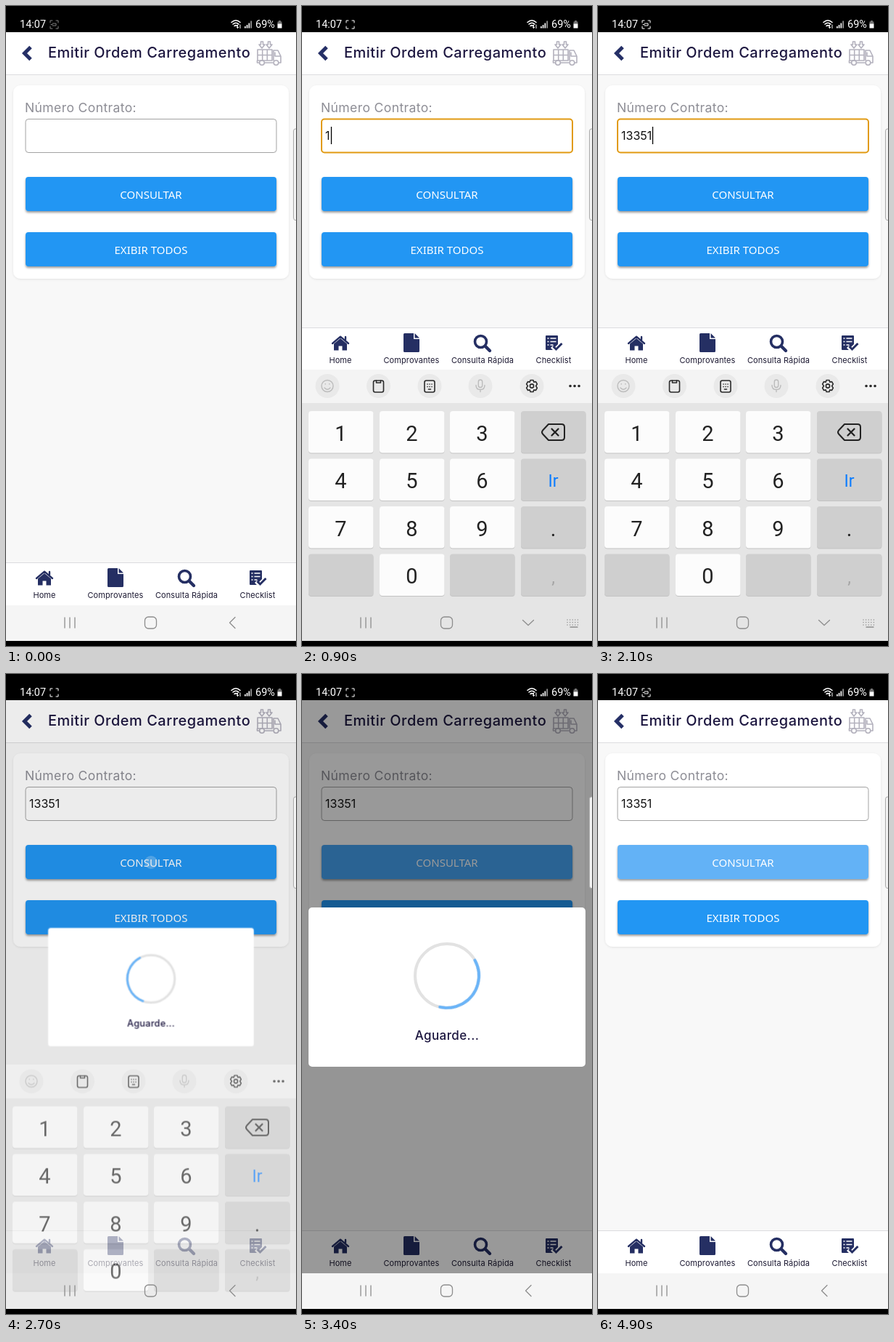
Animation, 400 px wide and 880 px high, one loop 5000 ms. Source, as an HTML page:

```html
<!DOCTYPE html>
<html lang="pt-BR">
<head>
<meta charset="utf-8">
<title>Emitir Ordem Carregamento</title>
<style>
html, body { margin: 0; width: 100%; height: 100%; overflow: hidden; background: #000; }
svg { display: block; width: 100%; height: 100%; }
text { font-family: Inter, sans-serif; }
.roboto { font-family: Roboto, sans-serif; }
.mid { text-anchor: middle; }
.line { fill: none; stroke-linecap: round; stroke-linejoin: round; }
.title { font-size: 20px; font-weight: 500; letter-spacing: .5px; fill: #1d1740; }
.label { font-size: 17.6px; letter-spacing: .35px; fill: #8d8d95; }
.value { font-size: 16px; fill: #111; }
.button { font: 15px "Noto Sans", sans-serif; fill: #fff; text-anchor: middle; }
.tab { font-size: 11px; letter-spacing: .1px; fill: #1d1a33; text-anchor: middle; }
.wait { font-size: 17px; font-weight: 500; letter-spacing: .4px; fill: #1d1740; text-anchor: middle; }
.key { font: 29px Roboto, sans-serif; fill: #222; text-anchor: middle; }

/* One loop is 50 ticks of 100 ms: 2% each */
.anim { animation: 5s step-end infinite; }
#frame { animation-name: focus; }
#caret { animation-name: caret; }
#recDot { animation-name: rec; }
#recBox { animation-name: recBox; }
.d1 { animation-name: d1; } .d2 { animation-name: d2; } .d3 { animation-name: d3; }
.d4 { animation-name: d4; } .d5 { animation-name: d5; }
.p3 { animation-name: p3; } .p5 { animation-name: p5; } .p1 { animation-name: p1; }
#tabs { animation-name: tabs; }
#keyboard { animation-name: keyboard; }
#down { animation-name: down; }
#back { animation-name: back; }
#touch { animation-name: touch; }
#query { animation-name: query; }
#shade { animation-name: shade; }
#dialog { animation-name: dialog; transform-origin: 200px 430.5px; }
#arc { transform-origin: 200px 415px; animation: spin 5s steps(50) infinite; }

@keyframes focus {
  0% { stroke: #a3a3a3; stroke-width: 1px; }
  2% { stroke: #e19a12; stroke-width: 2px; }
  54%, 100% { stroke: #a3a3a3; stroke-width: 1px; }
}
@keyframes caret {
  0% { visibility: hidden; transform: none; }
  4% { visibility: visible; }
  12% { visibility: hidden; }
  18% { visibility: visible; transform: translateX(7px); }
  26% { transform: translateX(16px); }
  28% { transform: translateX(25.5px); }
  34% { transform: translateX(35px); }
  40% { transform: translateX(42px); }
  54%, 100% { visibility: hidden; transform: none; }
}
@keyframes rec {
  0% { opacity: .5; } 2% { opacity: 1; } 18% { opacity: 0; } 26% { opacity: 1; }
  30% { opacity: 0; } 36% { opacity: 1; } 48% { opacity: 0; } 84%, 100% { opacity: 1; }
}
@keyframes recBox { 0% { opacity: .5; } 2%, 100% { opacity: 1; } }
@keyframes d1 { 0% { visibility: hidden; } 18%, 100% { visibility: visible; } }
@keyframes d2 { 0% { visibility: hidden; } 26%, 100% { visibility: visible; } }
@keyframes d3 { 0% { visibility: hidden; } 28%, 100% { visibility: visible; } }
@keyframes d4 { 0% { visibility: hidden; } 34%, 100% { visibility: visible; } }
@keyframes d5 { 0% { visibility: hidden; } 40%, 100% { visibility: visible; } }
@keyframes p3 { 0% { opacity: 0; } 26% { opacity: .13; } 30%, 100% { opacity: 0; } }
@keyframes p5 { 0% { opacity: 0; } 34% { opacity: .13; } 38%, 100% { opacity: 0; } }
@keyframes p1 { 0% { opacity: 0; } 40% { opacity: .13; } 42%, 100% { opacity: 0; } }
@keyframes tabs {
  0% { transform: none; } 6% { transform: translateY(-323px); } 54%, 100% { transform: none; }
}
@keyframes keyboard {
  0% { visibility: hidden; opacity: .7; transform: translateY(60px); }
  4% { visibility: visible; }
  6% { opacity: 1; transform: translateY(6px); }
  8% { transform: none; }
  54% { opacity: .64; transform: translateY(37.5px); }
  56% { opacity: .2; transform: translateY(150px); }
  58%, 100% { visibility: hidden; opacity: .2; transform: translateY(150px); }
}
@keyframes down { 0% { opacity: 0; } 6% { opacity: 1; } 54%, 100% { opacity: 0; } }
@keyframes back { 0% { opacity: 1; } 6% { opacity: 0; } 54%, 100% { opacity: 1; } }
@keyframes touch { 0% { opacity: 0; } 52% { opacity: .35; } 54% { opacity: .25; } 56%, 100% { opacity: 0; } }
@keyframes query { 0% { fill: #2196f3; } 56% { fill: #45a5f5; } 96%, 100% { fill: #64b2f6; } }
@keyframes shade {
  0% { opacity: 0; } 54% { opacity: .075; } 56% { opacity: .4; }
  96% { opacity: .1; } 98%, 100% { opacity: 0; }
}
@keyframes dialog {
  0% { visibility: hidden; opacity: 1; transform: scale(.743); }
  54% { visibility: visible; }
  56% { transform: scale(1.01); }
  58% { transform: scale(.97); }
  60% { transform: none; }
  96% { opacity: .4; transform: scale(.7); }
  98%, 100% { visibility: hidden; opacity: 0; transform: scale(.5); }
}
@keyframes spin { from { transform: rotate(2035deg); } to { transform: rotate(-1530deg); } }
</style>
</head>
<body>
<svg viewBox="0 0 400 880">
  <defs>
    <filter id="lift" x="-5%" y="-20%" width="110%" height="150%">
      <feDropShadow dx="0" dy="2" stdDeviation="1.5" flood-opacity=".4"/>
    </filter>
    <filter id="soft" x="-5%" y="-5%" width="110%" height="110%">
      <feDropShadow dx="0" dy="1" stdDeviation="1.5" flood-opacity=".09"/>
    </filter>
  </defs>

  <rect width="400" height="880" fill="#f8f8f8"/>

  <!-- header -->
  <rect y="36" width="400" height="58" fill="#fff"/>
  <path d="M0 94.5H400" stroke="#dcdcdf"/>
  <path d="M34 56.5L25.5 65L34 73.5" fill="none" stroke="#252f66" stroke-width="5"/>
  <text class="title" x="58" y="71">Emitir Ordem Carregamento</text>
  <g class="line" stroke="#b3b1bd" stroke-width="1.6">
    <path d="M351.500 49v4h-2.500l4 5 4-5h-2.500v-4zM361.500 49v4h-2.500l4 5 4-5h-2.500v-4z"/>
    <path d="M347 60h20v15h-20zM347 67.500h20M353.700 60v15M360.300 60v15M369 61h6l4 8v9h-2.500M369 61v14M371 64v5h7M346.500 75v3h3M357 78h11"/>
    <circle cx="353" cy="78" r="3.300"/><circle cx="372.500" cy="78" r="3.300"/>
  </g>

  <!-- form -->
  <rect x="10" y="109" width="380" height="266" rx="10" fill="#fff" filter="url(#soft)"/>
  <text class="label" x="26" y="146">Número Contrato:</text>
  <rect id="frame" class="anim" x="27" y="155.500" width="346" height="46" rx="4" fill="#fff"/>
  <text class="value" x="32" y="183.500"><tspan class="anim d1">1</tspan><tspan class="anim d2">3</tspan><tspan class="anim d3">3</tspan><tspan class="anim d4">5</tspan><tspan class="anim d5">1</tspan></text>
  <path id="caret" class="anim" d="M33.500 166V190" stroke="#000" stroke-width="1.300"/>
  <g filter="url(#lift)">
    <rect id="query" class="anim" x="27" y="235" width="346" height="47" rx="4"/>
    <rect x="27" y="311" width="346" height="47" rx="4" fill="#2196f3"/>
  </g>
  <text class="button" x="200" y="264.500">CONSULTAR</text>
  <text class="button" x="200" y="340.500">EXIBIR TODOS</text>
  <circle id="touch" class="anim" cx="200" cy="259" r="9" fill="#fff"/>

  <!-- app tabs; the dark block shows while the page is resized -->
  <g id="tabs" class="anim">
    <rect y="824" width="400" height="330" fill="#333"/>
    <rect y="765" width="400" height="59" fill="#fff"/>
    <path d="M0 765.500H400" stroke="#dcdcdf"/>
    <g fill="#252f63">
      <path d="M44 787.500l9-7.500 9 7.500v9h-6.500v-6h-5v6H44z"/>
      <path class="line" d="M42 787l11-9.300L64 787M60 778v4" stroke="#252f63" stroke-width="2.400"/>
      <path d="M141.500 773H154v8h8v16.500q0 1.500-1.500 1.500h-19q-1.500 0-1.500-1.500v-23q0-1.500 1.500-1.500zM155.500 773l6.500 6.500h-6.500z"/>
      <circle cx="246.500" cy="784.500" r="8" fill="none" stroke="#252f63" stroke-width="3.600"/>
      <path class="line" d="M252.500 790.500l6.500 6.500" stroke="#252f63" stroke-width="4.400"/>
      <path d="M337 776h15q1 0 1 1v11l-4 4-3-2-3 3 3 3h-9q-1 0-1-1v-18q0-1 1-1z"/>
      <path d="M338.500 780h2m2 0h8M338.500 784.500h2m2 0h8M338.500 789h2m2 0h4" stroke="#fff" stroke-width="1.500"/>
      <path d="M346.500 791l4 4 8-8" fill="none" stroke="#252f63" stroke-width="3"/>
    </g>
    <text class="tab" x="53" y="813.500">Home</text>
    <text class="tab" x="151" y="813.500">Comprovantes</text>
    <text class="tab" x="249" y="813.500">Consulta Rápida</text>
    <text class="tab" x="347" y="813.500">Checklist</text>
  </g>

  <rect id="shade" class="anim" y="36" width="400" height="788"/>

  <g id="dialog" class="anim">
    <rect x="9" y="321" width="382" height="219" rx="5" fill="#fff"/>
    <circle cx="200" cy="415" r="44" fill="none" stroke="#e2e2e2" stroke-width="4"/>
    <circle id="arc" class="line" cx="200" cy="415" r="44" stroke="#6ab4f8" stroke-width="4" pathLength="360" stroke-dasharray="132 228"/>
    <text class="wait" x="200" y="503">Aguarde...</text>
  </g>

  <path d="M402 169H399q-2.500 0-2.500 3V291q0 3.500 2.500 3.500H402" fill="#f3f3f3" stroke="#aaa"/>
  <rect y="824" width="400" height="56" fill="#f5f5f5"/>

  <g id="keyboard" class="anim">
    <rect y="500" width="400" height="380" fill="#e5e5e5"/>
    <rect y="500" width="400" height="46" fill="#f4f4f4"/>
    <g id="toolbar" fill="#e9e9e9"></g>
    <g class="line" stroke="#bcbcbc" stroke-width="1.400">
      <circle cx="35" cy="522.500" r="8"/>
      <path d="M31 525q4 4.500 8 0M32.200 519.500v.5M37.800 519.500v.5"/>
      <rect x="243.300" y="514" width="5.400" height="10.500" rx="2.700"/>
      <path d="M240 521.500q0 6 6 6t6-6M246 527.500v3"/>
    </g>
    <g class="line" stroke="#2a2a2a" stroke-width="1.600">
      <rect x="98.500" y="515" width="14" height="16" rx="2.500"/><path d="M102.500 515v3h6v-3"/>
      <rect x="169" y="515" width="14" height="16" rx="2.500"/>
      <path d="M173 520h.1m2.900 0h.1m2.900 0h.1M173 523.500h.1m2.900 0h.1m2.900 0h.1M174.500 527h3"/>
      <circle cx="317" cy="522.500" r="2.600"/>
      <path d="M315 514.500h4l.8 2.600 2.600-.6 2 3.400-1.800 2.600 1.800 2.600-2 3.400-2.600-.6-.8 2.600h-4l-.8-2.600-2.600.6-2-3.400 1.800-2.600-1.800-2.600 2-3.400 2.600.6z"/>
      <path d="M370 522.500h.1M376 522.500h.1M382 522.500h.1" stroke-width="3.600"/>
    </g>
    <g id="keys"></g>
    <rect class="anim p3" x="204" y="557" width="89.500" height="57.500" rx="4"/>
    <rect class="anim p5" x="107" y="622.500" width="89.500" height="57.500" rx="4"/>
    <rect class="anim p1" x="9" y="557" width="89.500" height="57.500" rx="4"/>
    <g class="line" stroke="#222" stroke-width="2">
      <path d="M340 575h18q4 0 4 4v14q0 4-4 4h-18l-8-8.500q-2-2.500 0-5z"/>
      <path d="M344.500 581.500l9 9m0-9l-9 9" stroke-width="2.300"/>
    </g>
  </g>

  <!-- system bar -->
  <g class="line" stroke="#8d8d8d" stroke-width="1.300">
    <path d="M81 841v14M88 841v14M95 841v14"/>
    <rect x="191.500" y="840" width="16" height="16" rx="5"/>
    <path id="back" class="anim" d="M316 840.500l-7.500 7.500 7.500 7.500"/>
    <g id="down" class="anim">
      <path d="M304.500 844.500l7.500 7 7.500-7"/>
      <path d="M366 844h18M366 847.500h18M366 851h18" stroke-dasharray=".1 3.500"/>
      <path d="M370 854h10"/>
    </g>
  </g>
  <rect y="873" width="400" height="7"/>

  <!-- status bar -->
  <rect width="400" height="36"/>
  <g fill="#fff">
    <text class="roboto" x="19" y="30" font-size="14.500">14:07</text>
    <text class="roboto" x="344" y="30" font-size="14.500">69%</text>
    <g class="line" stroke="#fff">
      <path id="recBox" class="anim" d="M61 23v-3h3M69 20h3v3M72 28v3h-3M64 31h-3v-3"/>
      <path id="recDot" class="anim" d="M64 24h5v3h-5M62 25.500h2"/>
      <path d="M311 22.500q6-5.500 12 0M313 25q4-3.500 8 0M315 27.500q2-1.800 4 0" stroke-width="1.600"/>
      <path d="M319.500 26v4.500m-1.400-1.400l1.400 1.400 1.400-1.400M323 30.500v-4.500" stroke-width="1"/>
    </g>
    <path d="M329 28h1.700v2.500H329zM331.700 26h1.700v4.500h-1.700zM334.500 23.500h1.700v7h-1.700z"/>
    <path d="M337.300 20.500h1.700v10h-1.700z" opacity=".6"/>
    <path d="M376 20h3v1.500h1.500v3.500h-6v-3.500H376z" opacity=".45"/>
    <path d="M374.500 24.500h6v6h-6z"/>
  </g>
</svg>
<script>
const byId = id => document.getElementById(id);

byId('toolbar').innerHTML = [35, 105.5, 176, 246, 317]
  .map(x => `<circle cx="${x}" cy="522.500" r="16.500"/>`).join('');

const rows = ['123<', '456>', '789.', ' 0 ,'];
const columns = [9, 107, 204, 302];

function key(char, row, col) {
  const x = columns[col], y = 557 + row * 65.5;
  const fill = /\d/.test(char) ? '#fcfcfc' : '#cfcfcf';
  const box = (top, color) =>
    `<rect x="${x}" y="${top}" width="89.500" height="57.500" rx="4" fill="${color}"/>`;
  const label = { '<': '', '>': 'Ir' }[char] ?? char;
  const style = char === '>' ? 'style="font-size:23px;fill:#0a7cff"'
    : char === ',' ? 'style="font-size:24px;fill:#a5a5a5"' : '';
  const baseline = y + (char === '>' ? 38 : 40.5);
  return box(y + 1, '#c3c3c3') + box(y, fill) +
    `<text class="key" x="${x + 44.5}" y="${baseline}" ${style}>${label}</text>`;
}

byId('keys').innerHTML = rows
  .map((chars, row) => [...chars].map((char, col) => key(char, row, col)).join('')).join('');
</script>
</body>
</html>
```
